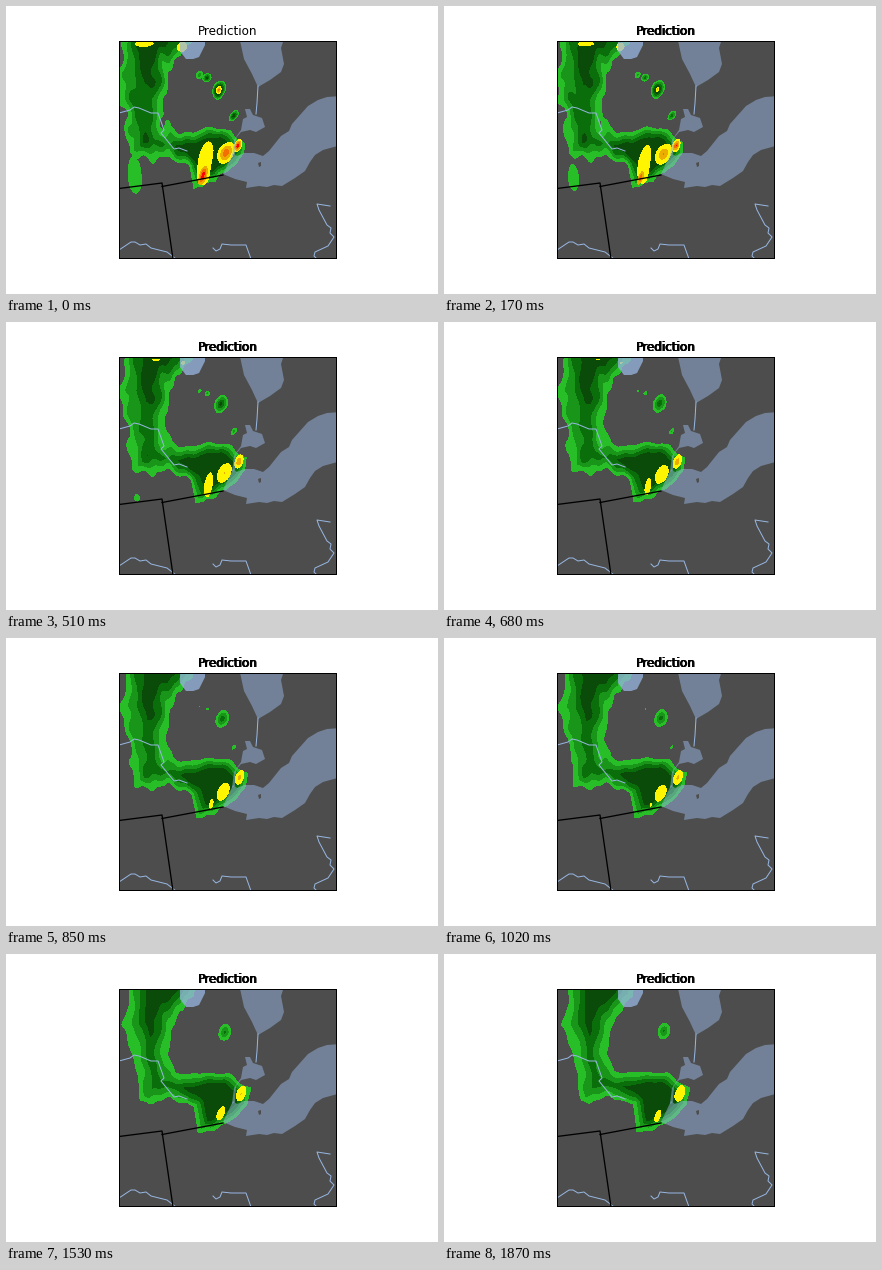
Animation of 432 by 288 pixels, one loop 2.04 s. Source, as a matplotlib script:

```python
import numpy as np
import matplotlib.pyplot as plt
from matplotlib.animation import FuncAnimation
from matplotlib.colors import ListedColormap
from matplotlib.patches import Polygon

W, H, DPI = 432, 288, 72
FRAMES, INTERVAL = 12, 170
LEFT, TOP, SIZE = 113.2, 35.2, 217
RIGHT, BOTTOM = LEFT + SIZE, TOP + SIZE
LAND = "#4d4d4d"
WATER = (0.594, 0.714, 0.882)
# No rain, four greens, yellow, two oranges, red
RAIN = ListedColormap([LAND, "#28be28", "#199619", "#0a6e0a", "#0a4b0a",
                       "#fff500", "#edac00", "#f26f00", "#ff0000"])
DEPTHS = [0, 6, 12, 19]

fig = plt.figure(figsize=(W / DPI, H / DPI), dpi=DPI, facecolor="white")
ax = fig.add_axes([LEFT / W, 1 - BOTTOM / H, SIZE / W, SIZE / H])
X, Y = np.meshgrid(LEFT + 0.5 + np.arange(SIZE), TOP + 0.5 + np.arange(SIZE))


def points(*flat):
    return np.array(flat, float).reshape(-1, 2)


# Outline of the main rain band at the start and the end of the loop
BAND_START = points(
    118, -10, 116, 48, 114, 68, 114, 95, 119, 118, 121, 150, 134, 154, 160, 152,
    182, 162, 189, 181, 204, 179, 228, 161, 239, 148, 239, 136, 228, 130, 217, 121,
    188, 125, 161, 126, 158, 104, 166, 75, 167, 55, 183, 42, 186, -10)
BAND_END = points(
    126, -10, 125, 48, 119, 71, 128, 92, 134, 118, 136, 148, 145, 149, 165, 143,
    190, 150, 193, 178, 206, 178, 230, 165, 243, 152, 246, 134, 234, 127, 222, 118,
    196, 119, 170, 118, 163, 100, 168, 75, 175, 58, 189, 43, 190, -10)


def ripple(waves=12):
    """Smooth seeded noise made of plane waves."""
    rng = np.random.default_rng(4)
    total = np.zeros_like(X)
    for _ in range(waves):
        angle, phase = rng.uniform(0, 2 * np.pi, 2)
        k = 2 * np.pi / rng.uniform(10, 30)
        total += np.sin(k * (X * np.cos(angle) + Y * np.sin(angle)) + phase)
    return total / np.sqrt(waves)


def bump(x, y, sx, sy):
    return np.exp(-((X - x) / sx) ** 2 - ((Y - y) / sy) ** 2)


NOISE = ripple()
# Bands lie closer together in the southern storm and at the top edge
GAIN = 0.85 + 1.3 * bump(212, 148, 38, 38) + 0.35 * bump(155, 35, 80, 25)


def depth(outline):
    """Signed distance to a polygon, positive inside."""
    nearest = np.full_like(X, np.inf)
    inside = np.zeros(X.shape, bool)
    for (x0, y0), (x1, y1) in zip(outline, np.roll(outline, -1, 0)):
        dx, dy = x1 - x0, y1 - y0
        s = np.clip(((X - x0) * dx + (Y - y0) * dy) / (dx * dx + dy * dy), 0, 1)
        nearest = np.minimum(nearest, np.hypot(X - x0 - s * dx, Y - y0 - s * dy))
        if dy:
            inside ^= ((Y < y0) != (Y < y1)) & (X < x0 + (Y - y0) * dx / dy)
    return np.where(inside, nearest, -nearest)


class Cell:
    """Drifting ellipse; its level rises by `heat` from the rim to the centre."""

    def __init__(self, rim, start, end, size, end_size=(0, 0), heat=(0, 0),
                 life=FRAMES - 1, lean=0.15):
        self.rim, self.heat, self.life, self.lean = rim, heat, life, lean
        self.path = np.array([start, end], float)
        self.sizes = np.array([size, end_size], float)

    def levels(self, n):
        u = n / self.life
        if u > 1:
            return np.zeros(X.shape, int)
        x, y = self.path[0] * (1 - u) + self.path[1] * u
        rx, ry = self.sizes[0] * (1 - u) + self.sizes[1] * u + 0.01
        hot, cool = self.heat
        heat = cool + (hot - cool) * np.exp(-n / 3)
        r = np.hypot((X - x + self.lean * (Y - y)) / rx, (Y - y) / ry) + 0.08 * NOISE
        return np.where(r < 1, self.rim + np.floor(heat * (1 - r)), 0).astype(int)


cells = [
    # Isolated northern cells
    Cell(1, (213, 84), (220, 77), (6.5, 10), (6.5, 8), heat=(7, 2)),
    Cell(1, (228, 110), (228, 109), (4.5, 6), heat=(5, 0), life=9, lean=0.4),
    Cell(1, (194, 69), (194, 69), (3.5, 4), heat=(2, 0), life=6),
    Cell(1, (201, 72), (202, 71), (4.5, 4.5), heat=(4, 0), life=7),
    # Tail of the western band
    Cell(1, (129, 170), (131, 176), (7, 19), (3, 4), life=3, lean=-0.05),
    # Cores on the northern edge
    Cell(5, (138, 38), (158, 38), (10, 3), life=5),
    Cell(5, (176, 41), (178, 41), (5, 5), life=5),
    # Cores of the southern storm
    Cell(5, (199, 158), (207, 167), (7.5, 22), (1, 2), life=6),
    Cell(6, (197, 170), (196, 177), (4, 10), heat=(3, 0), life=3, lean=0.3),
    Cell(5, (220, 147), (214, 162), (8.5, 11), (3, 6), heat=(3, 0), lean=0.3),
    # Core beside the river
    Cell(5, (232, 140), (236, 140), (4, 6.5), (5, 8), heat=(4.4, 1), lean=0.25),
]


def rain(n):
    u = n / (FRAMES - 1)
    band = depth(BAND_START * (1 - u) + BAND_END * u) + (3 - 1.8 * u) * NOISE / GAIN
    levels = np.digitize(band * GAIN, DEPTHS)
    for cell in cells:
        levels = np.maximum(levels, cell.levels(n))
    return levels


def lake(*flat, color=WATER, alpha=0.5):
    ax.add_patch(Polygon(points(*flat), fc=color, ec="none", alpha=alpha, zorder=3))


def line(*flat, color=WATER, width=1.0):
    ax.plot(*points(*flat).T, color=color, lw=width, zorder=4)


picture = ax.imshow(rain(0), cmap=RAIN, vmin=-0.5, vmax=8.5, interpolation="nearest",
                    extent=(LEFT, RIGHT, BOTTOM, TOP), aspect="auto", zorder=1)

# The bay is covered twice
for _ in range(2):
    lake(174, 30, 174, 45, 180, 53, 187, 53, 193, 51, 196, 45, 199, 39, 199, 30)
lake(233, 30, 238, 53, 246, 68, 252, 81, 264, 74, 275, 66, 278, 58, 275, 42, 279, 30)
lake(239, 103, 244, 103, 247, 109, 256, 112, 259, 121, 250, 126, 244, 124, 235, 126,
     230, 132, 229, 148, 226, 150, 228, 134, 235, 124, 237, 113, 241, 111)
lake(335, 90, 321, 91, 312, 94, 302, 100, 294, 109, 286, 118, 283, 125, 275, 130,
     263, 145, 257, 150, 248, 147, 238, 147, 231, 150, 227, 147, 217, 168, 229, 173,
     241, 176, 240, 182, 253, 180, 261, 181, 268, 179, 276, 180, 289, 172, 299, 165,
     304, 156, 309, 149, 317, 144, 335, 139)
lake(252, 157, 255, 156, 255, 160, 253, 161, color=LAND, alpha=1)

line(252, 80, 251, 97, 250, 108)
line(113, 107, 124, 104, 128, 101, 133, 102, 145, 107, 152, 107, 158, 124, 155, 127,
     168, 143, 173, 142, 181, 145)
line(113, 244, 125, 236, 129, 236, 134, 239, 140, 238, 145, 242, 161, 246, 170, 253)
line(207, 242, 210, 245, 214, 243, 216, 238, 225, 239, 240, 239, 245, 253)
line(324, 200, 311, 198, 313, 204, 321, 219, 325, 222, 324, 227, 328, 231, 322, 240,
     309, 246, 308, 250, 311, 253)
line(113, 182.5, 156, 177, 167, 253, color="black", width=1.3)
line(156, 180.5, 217, 169, color="black", width=1.3)

ax.set(xlim=(LEFT, RIGHT), ylim=(BOTTOM, TOP), xticks=[], yticks=[])
for spine in ax.spines.values():
    spine.set(linewidth=1, zorder=6)


def caption(x):
    return fig.text(x / W, 1 - 29.2 / H, "Prediction", size=12, ha="center",
                    va="baseline", family="DejaVu Sans")


caption(LEFT + SIZE / 2)
overprint = [caption(LEFT + SIZE / 2 + dx) for dx in (0, 0, 0.6)]


def update(n):
    picture.set_data(rain(n))
    # The caption is printed over itself after the first step
    for text in overprint:
        text.set_visible(n > 0)
    return [picture, *overprint]


anim = FuncAnimation(fig, update, frames=FRAMES, interval=INTERVAL,
                     repeat=True, repeat_delay=0)
plt.show()
```
